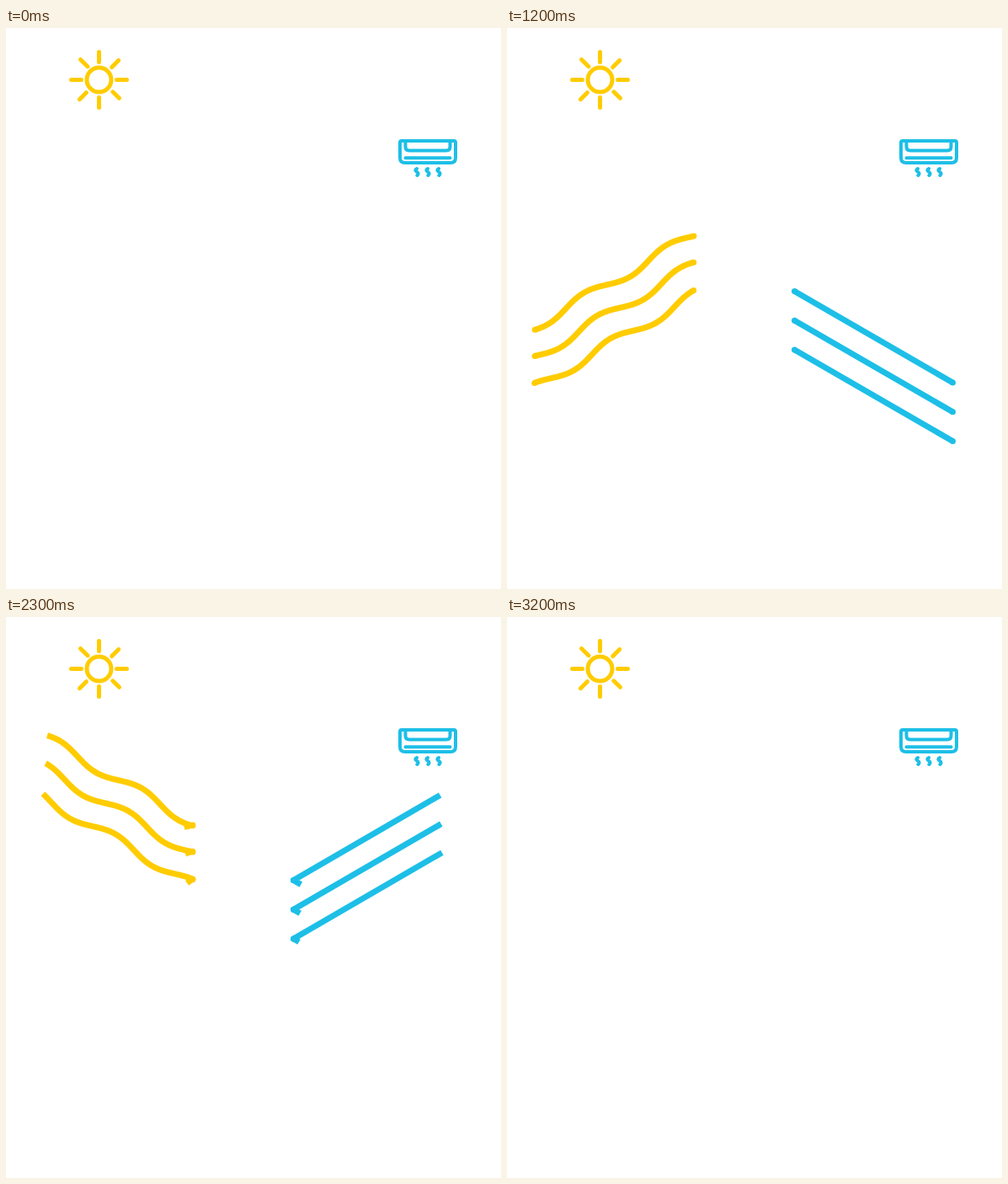
Recreate the animation shown at these times as an HTML page. Size 588 by 666 pixels, loop 3.7 s.

```html
<!DOCTYPE html>
<html lang="en">
<head>
<meta charset="utf-8">
<title>Heat and cool rays</title>
<style>
  html, body { margin: 0; width: 100%; height: 100%; overflow: hidden; background: #fff; }
  svg { display: block; width: 588px; height: 666px; }
  .line { fill: none; }
  .icon { fill: none; stroke-linecap: round; stroke-linejoin: round; }
</style>
</head>
<body>
<svg id="stage" viewBox="0 0 588 666" xmlns="http://www.w3.org/2000/svg">
  <g class="icon" stroke="#fc0" stroke-width="5">
    <circle cx="110.5" cy="61.5" r="14.5"/>
    <path d="M110.5 28.5v12M110.5 82.5v12M77.5 61.5h12M131.5 61.5h12
      M88.5 37.5l8.5 8.2M133.7 38.5l-8 8M126.8 75.8l7.7 7.5M95.4 76.7l-8 8"/>
  </g>
  <g class="icon" stroke="#1dbfe7" stroke-width="4">
    <path d="M470 134h62q2 0 2 2v18q0 6-6 6h-54q-6 0-6-6v-18q0-2 2-2z"/>
    <path d="M474.5 134v7q0 4.5 4.5 4.5h44q4.5 0 4.5-4.5v-7M474.5 154.3h53"/>
    <path id="breeze"/>
  </g>
</svg>
<script>
const NS = "http://www.w3.org/2000/svg";
const stage = document.getElementById("stage");
const YELLOW = "#fc0", BLUE = "#1dbfe7";
const LOOP = 3700, STEP = 100, LAST_STEP = 32;
const WIDTH = 7, GAP = 34.75;
const LEFT = 33, RIGHT = 222;

document.getElementById("breeze").setAttribute("d", [488, 501, 514].map(x =>
  `M${x} 167c-3 1.6-1.2 3 .4 4.1c2 1.5 1.2 2.8 0 3.9`).join(""));

function add(tag, attrs) {
  const el = document.createElementNS(NS, tag);
  for (const key in attrs) el.setAttribute(key, attrs[key]);
  return stage.appendChild(el);
}

// A sine wave along a 30 degree axis, cut off at LEFT and RIGHT. dir: -1 rises, 1 falls.
function wave(cx, cy, dir) {
  const points = [], cos = Math.cos(Math.PI / 6);
  for (let s = -100; s < 220; s += 0.5) {
    const swing = 5.5 * Math.sin(2 * Math.PI * s / 113);
    const x = cx + s * cos - swing / 2;
    const y = cy + dir * (s / 2 + swing * cos);
    if (x >= LEFT - 0.3 && x <= RIGHT) points.push([x, y]);
  }
  return points;
}

// A line with round outer ends and flat cuts wherever it is trimmed.
function makeLine(points, color) {
  const shown = points.map(p => p.map(v => v.toFixed(2)).join(" "));
  const path = add("path", {
    class: "line", d: "M" + shown.join("L"), stroke: color,
    "stroke-width": WIDTH, "stroke-linejoin": "round", pathLength: 1
  });
  const caps = [points[0], points[points.length - 1]].map(([cx, cy]) =>
    add("circle", { cx, cy, r: WIDTH / 2, fill: color }));
  const show = (el, on) => el.setAttribute("visibility", on ? "visible" : "hidden");

  return (tail, front) => {
    const a = Math.max(0, tail), b = Math.min(1, front);
    const visible = b > a;
    show(path, visible);
    show(caps[0], visible && tail <= 0);
    show(caps[1], visible && front >= 1);
    if (visible) path.setAttribute("stroke-dasharray", `0 ${a} ${b - a} 9`);
  };
}

const incoming = [], outgoing = [];
for (let k = 0; k < 3; k++) {
  const dx = 15.5 * k, dy = 27.3 * k, drop = GAP * k;
  const bounce = [341.5, 312.5 + drop];
  incoming.push(
    makeLine(wave(70 + dx, 333 + dy, -1), YELLOW),
    makeLine([[529.5, 421 + drop], bounce], BLUE));
  outgoing.push(
    makeLine(wave(85 - dx, 165.6 + dy, 1).reverse(), YELLOW),
    makeLine([bounce, [529.5, 203.5 + drop]], BLUE));
}

function draw(time) {
  const step = Math.floor((time % LOOP) / STEP);
  const active = step > 0 && step < LAST_STEP;
  const ramp = (at, value, rate, lead) => value + rate * (step - at) + lead;
  for (let i = 0; i < 6; i++) {
    const lead = 0.006 * Math.floor(i / 2);
    incoming[i](step > 12 ? ramp(16, 0.323, 0.09, lead) : 0,
      active ? ramp(5, 0.386, 0.09, lead) : 0);
    outgoing[i](step > 24 ? ramp(26, 0.206, 0.12, lead * 1.7) : 0,
      active && step > 12 ? ramp(16, 0.307, 0.0885, lead) : 0);
  }
}

const start = performance.now();
function tick() {
  draw(performance.now() - start);
  requestAnimationFrame(tick);
}
draw(0);
requestAnimationFrame(tick);
</script>
</body>
</html>
```
